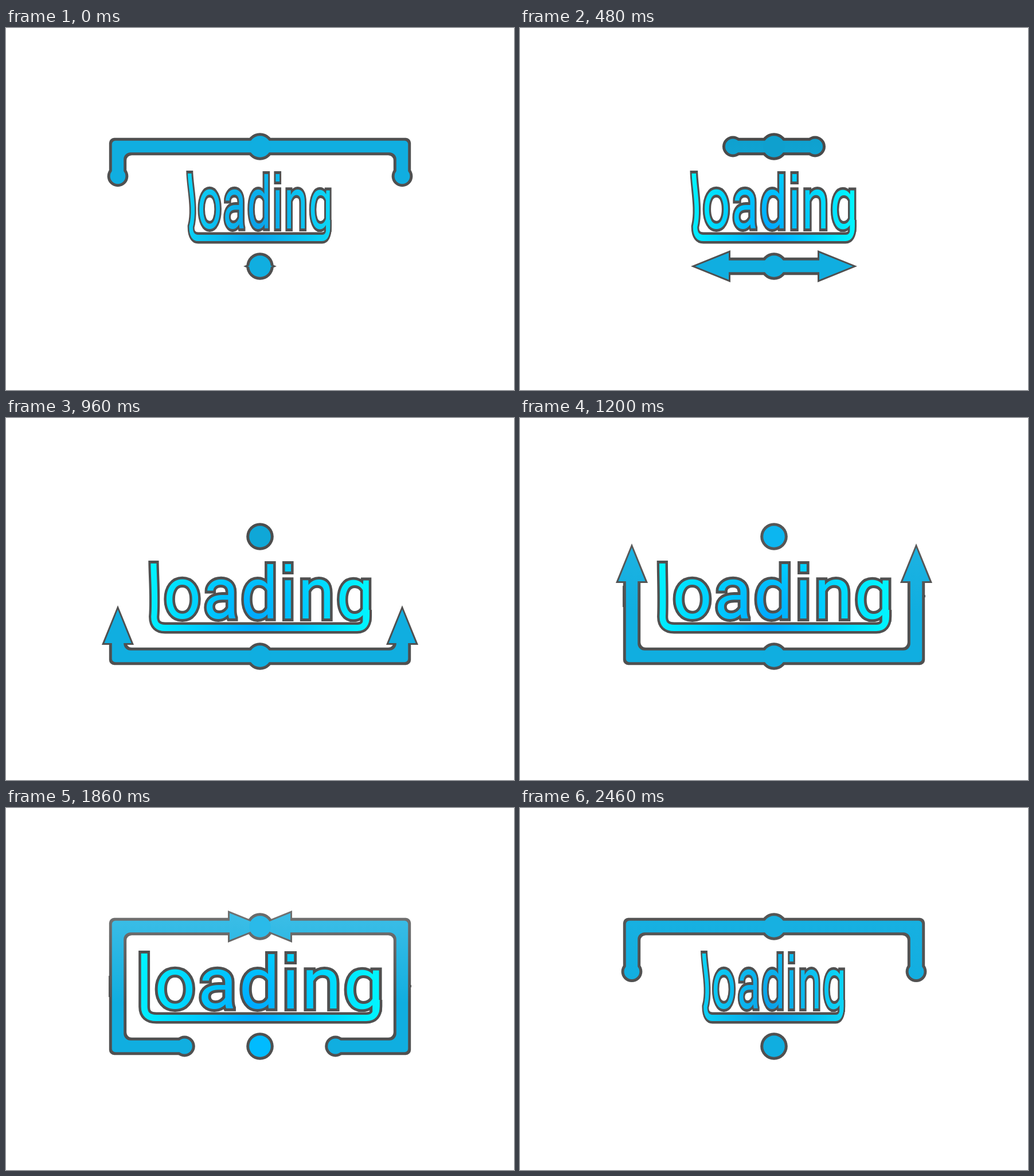
Recreate the animation shown at these times as an HTML page with a canvas. Size 886 by 632 pixels, loop 2520 ms.

```html
<!DOCTYPE html>
<html lang="en">
<head>
<meta charset="utf-8">
<title>Loading</title>
<style>
  html, body { margin: 0; width: 100%; height: 100%; overflow: hidden; background: #fff; }
  canvas { display: block; }
</style>
</head>
<body>
<canvas id="stage" width="886" height="632" role="img" aria-label="loading"></canvas>
<script>
const ctx = document.getElementById('stage').getContext('2d');
const LOOP = 2520, STEP = 60;
const MID = 443, LEFT = 195, TOP = 207, BOTTOM = 416;
// path lengths of one half: bottom centre -> corner -> corner -> top centre
const L1 = MID - LEFT, L2 = L1 + BOTTOM - TOP, L3 = L2 + L1;
const ARROW = 69, RIM = 5;
const BLUE = [16, 174, 224], VIVID = [0, 187, 255], EDGE = [80, 80, 80];

const clamp = (v, a, b) => Math.min(b, Math.max(a, v));
const ramp = (t, a, b) => clamp((t - a) / (b - a), 0, 1);
const bump = (t, a, b, c, d) => ramp(t, a, b) * (1 - ramp(t, c, d));
const mix = (a, b, k) => a.map((v, i) => v + (b[i] - v) * k);
const css = c => `rgb(${c.map(Math.round)})`;
const shade = (c, k) => mix(c, k > 0 ? [255, 255, 255] : [0, 0, 0], Math.abs(k));

// distance of the arrow tip and of the tail along the path
function tipAt(t) {
  const x = Math.min(t / 480, 4.5);
  return 29 + 60.4 * x + 64.4 * x ** 2 - 8.8 * x ** 3;
}
function tailAt(t) {
  const d = Math.max(0, t - 1494);
  return .34 * d + .0000535 * d * d;
}

// the word swells along an S-curve, then collapses ever faster
function halfWidth(t) {
  const x = (t / 688) ** 3.7;
  return 127 + 88 * (x / (x + 1) - ramp(t, 1878, 2460) ** 2);
}

function at(s) {
  if (s < L1) return [MID - s, BOTTOM];
  if (s < L2) return [LEFT, BOTTOM - (s - L1)];
  return [LEFT + s - L2, TOP];
}

function disc(x, y, r) {
  ctx.beginPath();
  ctx.arc(x, y, r, 0, 7);
  ctx.fill();
}

function stem(a, b, inset, mirrored) {
  const r = 21;
  ctx.save();
  ctx.beginPath();
  if (a < L1) {
    const end = b >= L1 ? LEFT - r : MID - b;
    ctx.rect(end, BOTTOM - r, MID - a - end, 2 * r);
  }
  if (a < L2 && b > L1) {
    const from = BOTTOM - Math.max(a, L1) + L1;
    const to = b >= L2 ? TOP - r : BOTTOM - b + L1;
    ctx.rect(LEFT - r, to, 2 * r, from - to);
  }
  if (b > L2) {
    const from = Math.max(a, L2);
    ctx.rect(at(from)[0], TOP - r, b - from, 2 * r);
  }
  ctx.clip();
  const o = 15.2 - inset, w = 2 * L1, h = BOTTOM - TOP;
  ctx.beginPath();
  ctx.roundRect(LEFT - o, TOP - o, w + 2 * o, h + 2 * o, inset ? 6 : 9);
  ctx.roundRect(LEFT + o, TOP + o, w - 2 * o, h - 2 * o, inset ? 12 : 9);
  ctx.fill('evenodd');
  if (!inset) {
    if (mirrored) ctx.fillRect(179, 309, 2, 4);
    else ctx.fillRect(179, 293, 2, 37);
  }
  ctx.restore();
}

// corners are turned by hand so that the gradient stays upright
function arrow(s, inset) {
  const [x, y] = at(s), [x0, y0] = at(s - 14), [x1, y1] = at(s + 14);
  const len = Math.hypot(x1 - x0, y1 - y0), c = (x1 - x0) / len, n = (y1 - y0) / len;
  const tip = inset ? 27 : 34.5, base = inset ? -31.5 : -34.5, h = inset ? 23.5 : 28;
  ctx.beginPath();
  for (const [u, v] of [[tip, 0], [base, -h], [base, h]]) ctx.lineTo(x + u * c - v * n, y + u * n + v * c);
  ctx.fill();
}

function half(t, inset, mirrored) {
  ctx.save();
  if (mirrored) {
    ctx.translate(2 * MID, 0);
    ctx.scale(-1, 1);
  }
  ctx.beginPath();
  ctx.rect(0, 0, MID, 632);
  ctx.clip();
  for (const p of [t - LOOP, t, t + LOOP]) {
    const tip = tipAt(p), a = tailAt(p), b = Math.min(tip - 54, L3);
    if (p < -120 || a >= L3) continue;
    if (b > a) stem(a, b, inset, mirrored);
    if (tip < L3 + ARROW) arrow(tip - ARROW / 2, inset);
    if (a > 0) disc(...at(a), 18.4 - inset);
  }
  ctx.restore();
}

function ring(t) {
  const lift = .18 * bump(t, 960, 1440, 2160, LOOP) - .08 * bump(t, 0, 480, 480, 1440);
  const hubs = [
    [TOP, bump(t, 960, 1440, 1680, 1900), lift],
    [BOTTOM, bump(t, 1440, 1620, 2220, 2460), 0]
  ];
  for (const [inset, color] of [[0, EDGE], [RIM, BLUE]]) {
    const g = ctx.createLinearGradient(0, 190, 0, 340);
    g.addColorStop(0, css(shade(color, lift)));
    g.addColorStop(1, css(color));
    ctx.fillStyle = g;
    half(t, inset, false);
    half(t, inset, true);
    for (const [y, glow, k] of hubs) {
      const c = shade(color, k * (1 - glow));
      ctx.fillStyle = css(inset ? mix(c, VIVID, glow) : c);
      disc(MID, y, 23.8 - inset);
    }
  }
}

// the l runs into the underline, which climbs into the g
function swash(bend, top, width) {
  const x = 240.5, low = x + 4 * bend, right = 647;
  ctx.lineWidth = width;
  ctx.beginPath();
  ctx.moveTo(x, top);
  ctx.bezierCurveTo(x, 275, x + 18 * bend, 316, low, 347);
  ctx.quadraticCurveTo(low, 366.5, low + 21, 366.5);
  ctx.lineTo(right - 18, 366.5);
  ctx.quadraticCurveTo(right, 366.5, right, 346);
  ctx.lineTo(right, 335);
  ctx.stroke();
}

// a clipped q is the bowl of the g; the i gets a square dot
function letters(draw, bend, rim) {
  const x = 258.5, dot = x + ctx.measureText('oad').width + 9.7;
  ctx.save();
  ctx.translate(658, 0);
  ctx.scale(1 - .0125 * bend, 1);
  ctx.translate(-658, 0);
  ctx.beginPath();
  ctx.rect(200, 200, 500, 156);
  ctx.clip();
  draw.call(ctx, 'oad\u0131nq', x, 350);
  ctx.fillRect(dot - rim, 255 - rim, 11.5 + 2 * rim, 13 + 2 * rim);
  ctx.restore();
}

function word(t) {
  const w = halfWidth(t), glow = bump(t, 0, 480, 2220, 2460);
  const bend = (213.5 - w) / 87;
  ctx.save();
  ctx.translate(444.5 - 2.9 * bend, 0);
  ctx.scale(w / 213.5, 1);
  ctx.translate(-444.5, 0);
  ctx.font = '126px Roboto, sans-serif';
  ctx.letterSpacing = '3.7px';
  ctx.miterLimit = 3;

  const g = ctx.createRadialGradient(432, 352, 0, 432, 352, 215);
  g.addColorStop(0, css(mix([10, 160, 232], [0, 168, 255], glow)));
  g.addColorStop(1, css(mix([12, 212, 246], [0, 244, 255], glow)));

  ctx.strokeStyle = ctx.fillStyle = css(EDGE);
  swash(bend, 249, 20);
  ctx.lineWidth = 2 * RIM;
  letters(ctx.strokeText, bend, RIM);
  ctx.strokeStyle = ctx.fillStyle = g;
  swash(bend, 254, 11);
  letters(ctx.fillText, bend, 0);
  ctx.restore();
}

function draw(now) {
  const t = Math.floor(now % LOOP / STEP) * STEP;
  ctx.fillStyle = '#fff';
  ctx.fillRect(0, 0, 886, 632);
  ring(t);
  word(t);
}

let start;
function tick(now) {
  start ??= now;
  draw(Math.max(0, now - start));
  requestAnimationFrame(tick);
}
draw(0);
requestAnimationFrame(tick);
</script>
</body>
</html>
```
